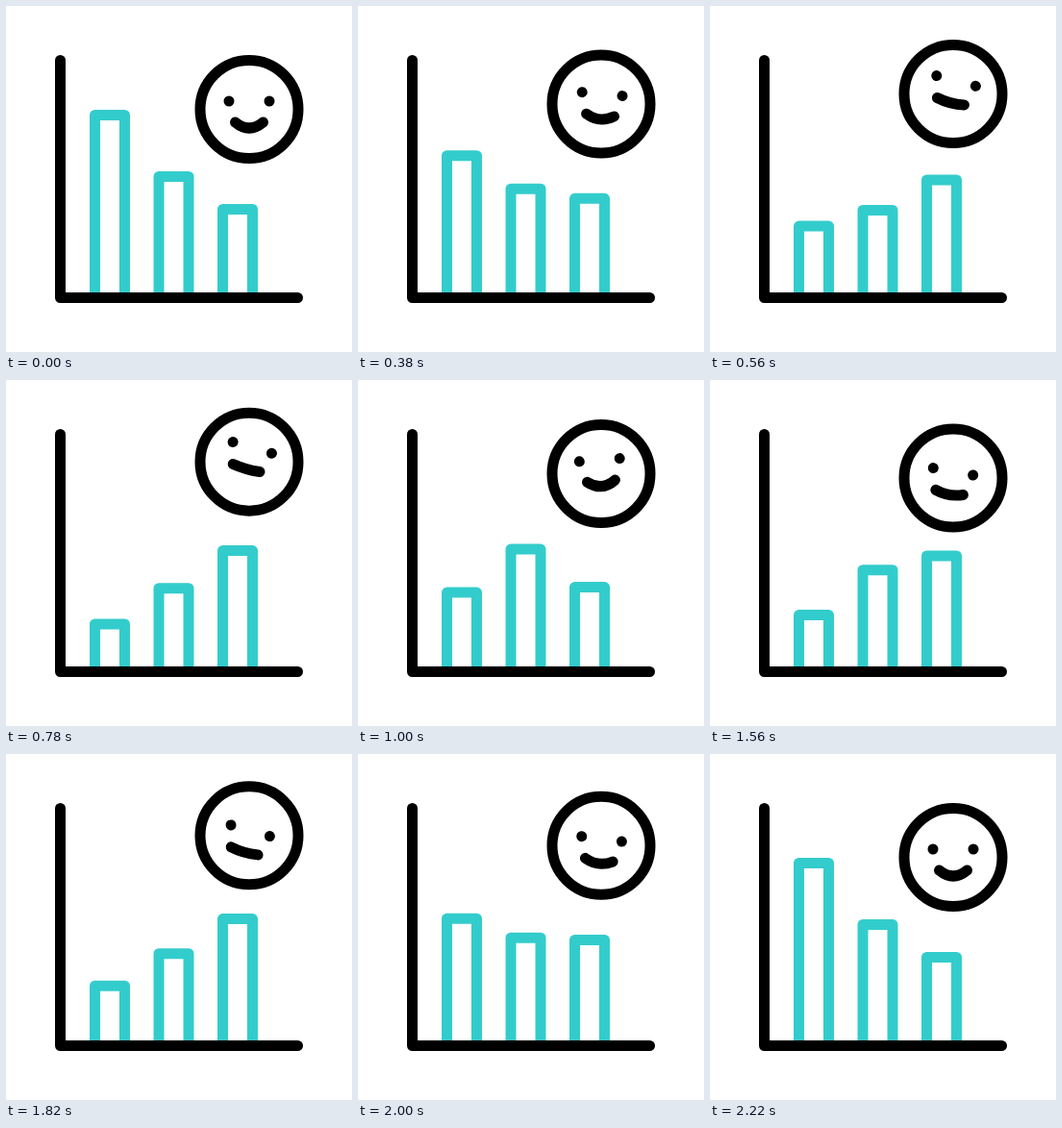
An HTML page with a canvas for the animation above (2400 ms loop, 360x360 px).

```html
<!DOCTYPE html>
<html lang="en">
<head>
<meta charset="utf-8">
<title>Bar chart with a face</title>
<style>
  html, body { margin: 0; width: 100%; height: 100%; overflow: hidden; background: #fff; }
  canvas { display: block; width: 360px; height: 360px; }
</style>
</head>
<body>
<canvas id="stage"></canvas>
<script>
const LOOP = 2400;
const INK = '#000', TEAL = '#33cccc', LINE = 11;
const BEATS = [200, 705, 1210, 1715, 2220];
const HOPS = [200, 760, 1335, 1800, 2220];

const canvas = document.getElementById('stage');
const ctx = canvas.getContext('2d');
const scale = window.devicePixelRatio || 1;
canvas.width = canvas.height = 360 * scale;

// Outer left edge and the height of the top edge at each beat
const bars = [
  { x: 87, tops: [108, 252, 194, 252, 108] },
  { x: 153.5, tops: [172, 215.5, 144, 206, 172] },
  { x: 220, tops: [206, 168, 235, 161, 206] }
];

const face = {
  y: [107.5, 85, 118, 84.7, 107.5],
  lookX: [0, 3.8, -5, 1.4, 0],
  lookY: [-8.5, -14.8, -14, -4.7, -8.5],
  tilt: [0, 18.5, -18, 18.2, 0],
  smile: [6, 0.5, 8.5, 0.8, 6]
};

// Smooth easing from key to key
function at(t, values, times = BEATS) {
  const last = times.length - 1;
  if (t <= times[0]) return values[0];
  if (t >= times[last]) return values[last];
  let i = 0;
  while (t >= times[i + 1]) i++;
  const u = (t - times[i]) / (times[i + 1] - times[i]);
  return values[i] + (values[i + 1] - values[i]) * u * u * (3 - 2 * u);
}

function stroke(color, path) {
  ctx.strokeStyle = color;
  ctx.beginPath();
  path();
  ctx.stroke();
}

function dot(x, y, r) {
  ctx.beginPath();
  ctx.arc(x, y, r, 0, Math.PI * 2);
  ctx.fill();
}

function drawBar(bar, t) {
  const top = at(t, bar.tops) + LINE / 2;
  stroke(TEAL, () => ctx.rect(bar.x + LINE / 2, top, 31, 303.5 - top));
}

function drawAxes() {
  stroke(INK, () => {
    ctx.moveTo(56.5, 56.5);
    ctx.lineTo(56.5, 303.5);
    ctx.lineTo(303.5, 303.5);
  });
}

function drawFace(t) {
  const smile = at(t, face.smile);
  ctx.save();
  ctx.translate(253, at(t, face.y, HOPS));
  stroke(INK, () => ctx.arc(0, 0, 51, 0, Math.PI * 2));

  ctx.translate(at(t, face.lookX), at(t, face.lookY));
  ctx.rotate(at(t, face.tilt) * Math.PI / 180);
  ctx.fillStyle = INK;
  dot(-21, 0, 5.5);
  dot(21, 0, 5.5);
  stroke(INK, () => {
    ctx.moveTo(-14.5, 22);
    ctx.quadraticCurveTo(0, 22 + smile * 2, 14.5, 22);
  });
  ctx.restore();
}

function draw(t) {
  ctx.setTransform(scale, 0, 0, scale, 0, 0);
  ctx.fillStyle = '#fff';
  ctx.fillRect(0, 0, 360, 360);
  ctx.lineWidth = LINE;
  ctx.lineCap = ctx.lineJoin = 'round';
  bars.forEach(bar => drawBar(bar, t));
  drawAxes();
  drawFace(t);
}

const start = performance.now();
function tick() {
  draw((performance.now() - start) % LOOP);
  requestAnimationFrame(tick);
}
tick();
</script>
</body>
</html>
```
